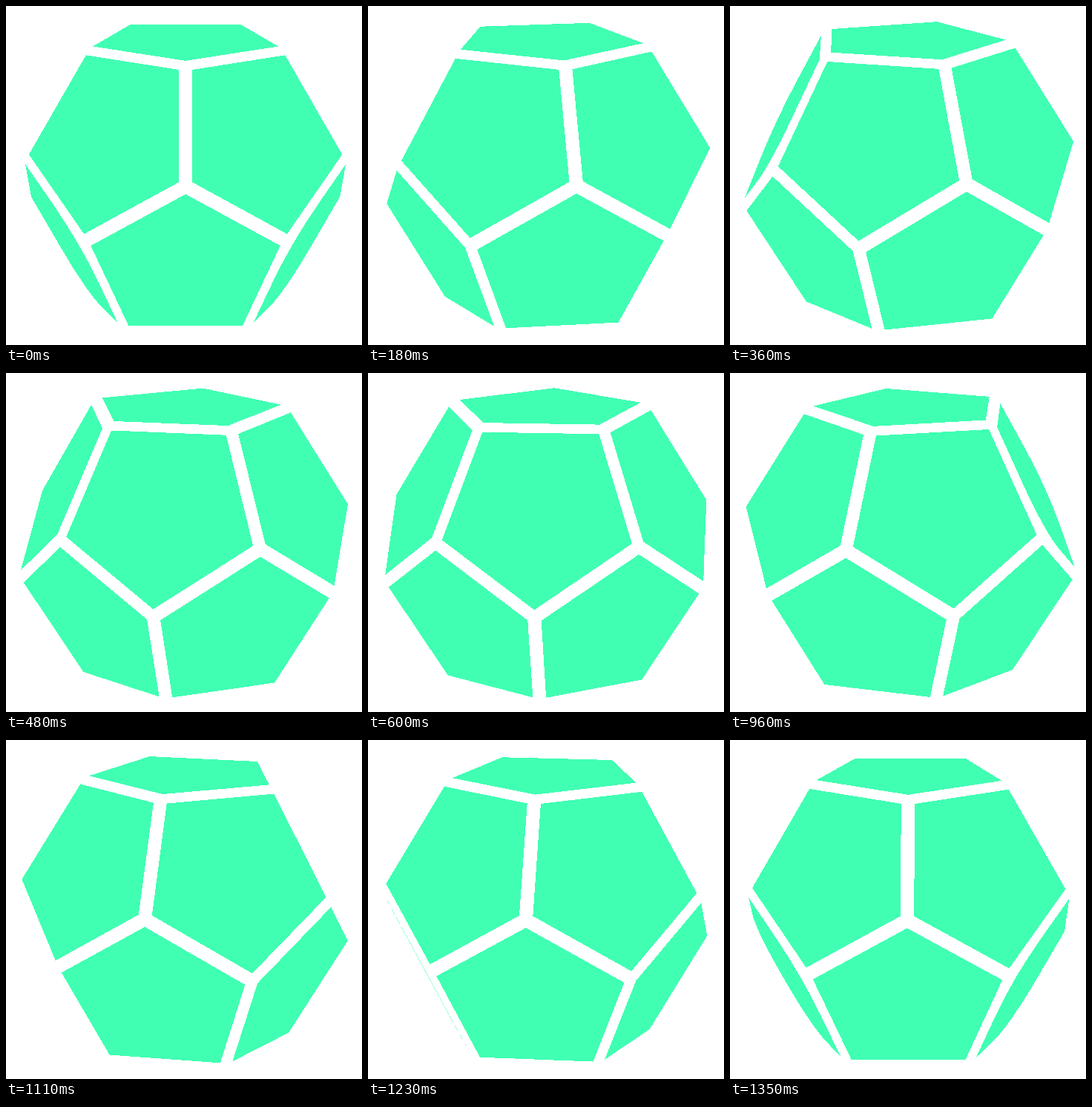
An HTML page for the animation above (1380 ms loop, 480x457 px).

```html
<!DOCTYPE html>
<html lang="en">
<head>
<meta charset="utf-8">
<title>Turning dodecahedron</title>
<style>
  html, body { margin: 0; width: 100%; height: 100%; overflow: hidden; background: #fff; }
  svg { display: block; width: 100%; height: 100%; }
  path { fill: #40ffb3; shape-rendering: crispEdges; }
</style>
</head>
<body>
<svg viewBox="0 0 480 457"><path id="solid"/></svg>
<script>
const LOOP = 1380, STEP = 30;
const RAD = Math.PI / 180;
const TURN = 72 * RAD / 45.5;     // rotation per step
const TILT = 14.6 * RAD;          // camera elevation
const SCALE = 166, DIST = 23;     // pixels per edge length, camera distance
const CX = 242.1, CY = 227.2;

// Regular dodecahedron with edge length 1
const INRADIUS = 1.11352, FACE_RADIUS = 0.85065;
const INSET = 0.91;
const SLOPE = Math.atan(0.5);

// Faces seen almost edge-on have their blunt corners rounded
const THIN_AREA = 5800, BLUNT = 18 * RAD;

// Faces as direction of the normal plus the turn of the pentagon in its plane
const faces = [{ yaw: 0, pitch: Math.PI / 2, turn: 0 }];
for (let k = 0; k < 5; k++) {
  faces.push({ yaw: (36 + 72 * k) * RAD, pitch: SLOPE, turn: 0 });
  faces.push({ yaw: 72 * k * RAD, pitch: -SLOPE, turn: Math.PI });
}

function project(x, h, z) {
  const y = h * Math.cos(TILT) - z * Math.sin(TILT);
  const depth = z * Math.cos(TILT) + h * Math.sin(TILT);
  const s = SCALE * DIST / (DIST - depth);
  return [CX + s * x, CY - s * y];
}

function corners({ yaw, pitch, turn }, spin) {
  const a = yaw + spin, sin = Math.sin(a), cos = Math.cos(a);
  return [0, 1, 2, 3, 4].map(i => {
    const b = turn + i * 72 * RAD;
    const side = INSET * FACE_RADIUS * Math.sin(b);
    const down = INSET * FACE_RADIUS * Math.cos(b);
    const out = INRADIUS * Math.cos(pitch) + down * Math.sin(pitch);
    const h = INRADIUS * Math.sin(pitch) - down * Math.cos(pitch);
    return project(out * sin + side * cos, h, out * cos - side * sin);
  });
}

const cross = ([ax, ay], [bx, by]) => ax * by - ay * bx;
const dot = ([ax, ay], [bx, by]) => ax * bx + ay * by;
const sub = ([ax, ay], [bx, by]) => [ax - bx, ay - by];
const mid = ([ax, ay], [bx, by]) => [(ax + bx) / 2, (ay + by) / 2];
const xy = p => p.map(v => v.toFixed(2)).join(" ");

// Positive when the face looks at the viewer
const area = pts =>
  pts.reduce((sum, p, i) => sum - cross(p, pts[(i + 1) % pts.length]) / 2, 0);

function toPath(pts) {
  const thin = area(pts) < THIN_AREA;
  const n = pts.length;
  let d = "M" + xy(mid(pts[n - 1], pts[0]));
  pts.forEach((p, i) => {
    const prev = pts[(i + n - 1) % n], next = pts[(i + 1) % n];
    const into = sub(p, prev), from = sub(next, p);
    const bend = Math.abs(Math.atan2(cross(into, from), dot(into, from)));
    d += (thin && bend < BLUNT ? `Q${xy(p)} ` : `L${xy(p)}L`) + xy(mid(p, next));
  });
  return d + "Z";
}

const solid = document.getElementById("solid");
function draw(ms) {
  const spin = TURN * Math.floor((ms % LOOP) / STEP);
  const visible = faces.map(f => corners(f, spin)).filter(pts => area(pts) > 0);
  solid.setAttribute("d", visible.map(toPath).join(""));
}

let start;
function tick(now) {
  start ??= now;
  draw(now - start);
  requestAnimationFrame(tick);
}
draw(0);
requestAnimationFrame(tick);
</script>
</body>
</html>
```
